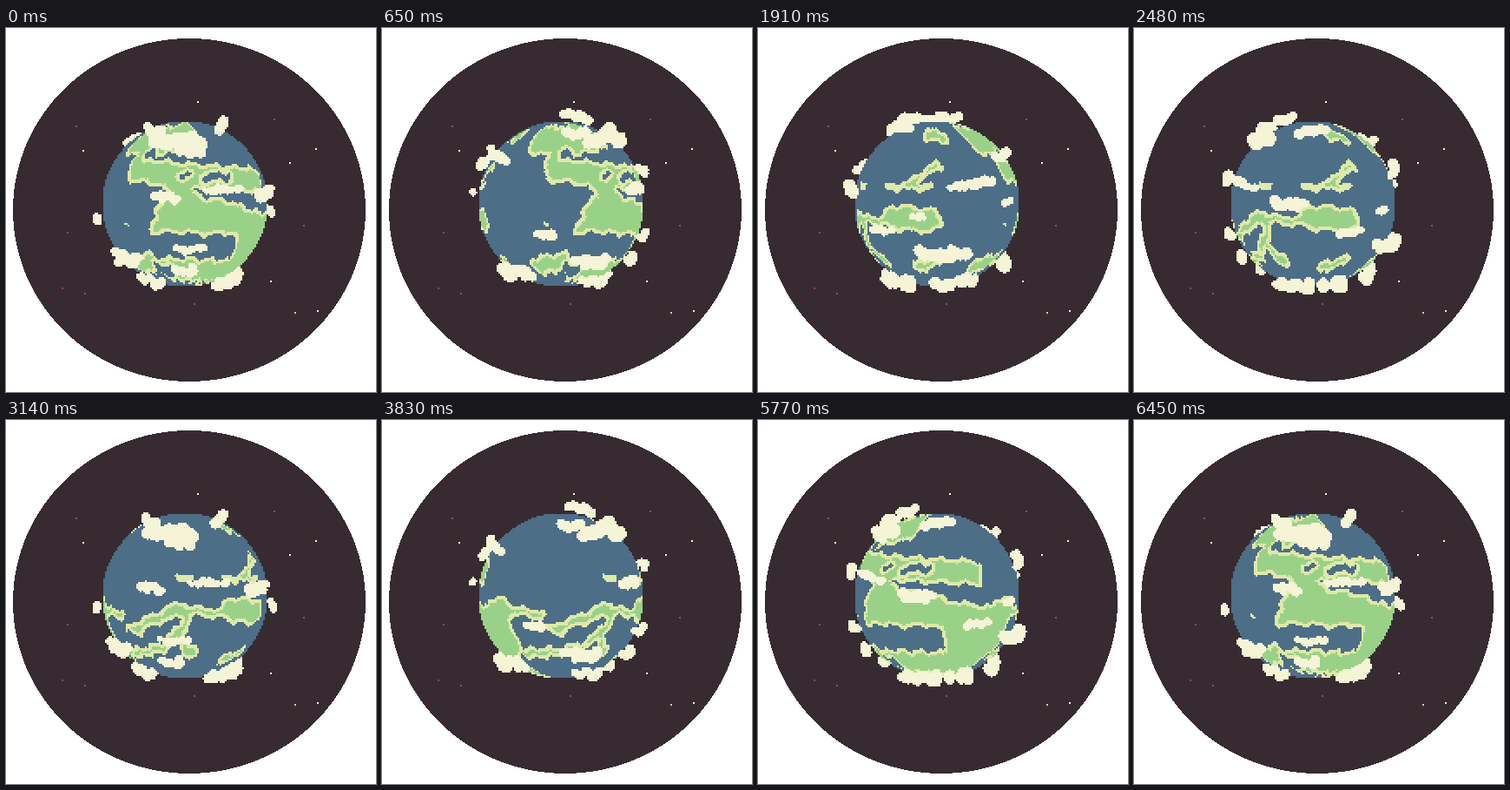
An HTML page with a canvas for the animation above (6.49 s loop, 426 by 418 pixels).

```html
<!DOCTYPE html>
<html>
<head>
<meta charset="utf-8">
<style>
  html, body { margin: 0; width: 426px; height: 418px; overflow: hidden; background: #fff; }
  svg, canvas { position: absolute; left: 0; top: 0; width: 426px; height: 418px; image-rendering: pixelated; }
</style>
</head>
<body>
<svg><ellipse cx="211" cy="209" rx="203" ry="197" fill="#372b31" shape-rendering="crispEdges"/></svg>
<canvas id="view" width="213" height="209"></canvas>
<script>
const LOOP = 6490, CX = 206, CY = 202, R = 94, CLOUD_R = 103;
const RAD = Math.PI / 180, TILT = 12 * RAD;
const W = 213, H = 209, MAP_W = 590, MAP_H = 2 * R, PER_DEG = MAP_W / 360;
const OCEAN = [77, 110, 135], GREEN = [154, 209, 136], COAST = [223, 233, 168], CLOUD = [245, 244, 214];

const ctx = document.getElementById('view').getContext('2d');
const image = ctx.createImageData(W, H);

// Brush strokes on the globe: width, then longitude and height of a few key points.
const land = [
  [36, -62, -74, -30, -70, 8, -80],
  [30, -42, -40, 0, -32, 68, -26],
  [24, -8, -18, 8, 0],
  [44, -8, 12, 25, 16, 50, 27, 80, 34],
  [20, -22, 26, 10, 20],
  [70, 66, 46, 88, 46],
  [24, 92, 14, 104, 14],
  [28, -25, 75, 90, 80],
  [22, -62, 72, -35, 66],
  [12, 105, 16, 132, 22],
  [16, 132, 48, 152, 34, 184, 14],
  [13, 110, 67, 140, 65, 165, 60, 186, 36, 184, 14],
  [30, 222, 16, 248, 19],
  [12, 190, 18, 222, 22],
  [14, 180, 44, 186, 62, 195, 68],
  [9, 217, -19, 250, -20],
  [12, 235, -22, 245, -38, 254, -42],
  [16, 240, -80, 262, -76],
  [14, 232, 74, 256, 65],
  [8, 182, -21, 190, -21],
  [3, -50, 25, -47, 25]
];
const water = [
  [24, -25, 50, 38, 48],
  [12, -30, 76, -16, 78],
  [10, -33, -55, -28, -56],
  [8, 16, -30, 34, -31],
  [7, 20, -11, 32, -10],
  [5, -3, -33, 2, -32],
  [16, 118, 42, 126, 45, 142, 53],
  [14, 160, 43, 172, 38]
];

// Cloud banks: longitude, height, length in degrees, puff size.
const banks = [
  [-9, -86, 50, 10], [6, -76, 20, 7], [-51, -92, 30, 7], [-13, -28, 13, 6], [28, -35, 26, 5],
  [3, 32, 18, 5], [0, 60, 12, 6], [-49, 51, 25, 8], [-37, 80, 25, 7], [-83, 14, 12, 5],
  [80, -93, 40, 7], [58, 85, 45, 8], [68, -20, 22, 7], [-140, -64, 30, 6], [-186, -42, 32, 6],
  [-160, -16, 6, 5], [-225, -5, 8, 5], [-210, 38, 32, 9], [-195, 79, 50, 8], [-115, 68, 32, 9],
  [-252, 13, 16, 5], [-255, 83, 30, 8]
];

const stars = [
  [CLOUD, 221, 85, 89, 141, 357, 139, 327, 155, 305, 291, 359, 325],
  [[236, 222, 150], 333, 327],
  [[146, 78, 84], 81, 113, 309, 105, 71, 235, 343, 227, 65, 299, 91, 305, 217, 317]
];

let seed = 7;
const random = () => (seed = seed * 16807 % 2147483647) / 2147483647;
const jitter = size => (random() - 0.5) * size;
const spin = (x, z, a) => [x * Math.cos(a) + z * Math.sin(a), z * Math.cos(a) - x * Math.sin(a)];

function buildMap() {
  const canvas = document.createElement('canvas');
  canvas.width = MAP_W;
  canvas.height = MAP_H;
  const g = canvas.getContext('2d');
  g.lineCap = g.lineJoin = 'round';
  const paint = ([width, ...p]) => {
    g.lineWidth = width;
    for (let wrap = -1; wrap <= 1; wrap++) {
      g.beginPath();
      for (let i = 0; i < p.length; i += 2) g.lineTo(p[i] * PER_DEG + wrap * MAP_W, p[i + 1] + R);
      g.stroke();
    }
  };
  land.forEach(paint);
  g.globalCompositeOperation = 'destination-out';
  water.forEach(paint);
  const data = g.getImageData(0, 0, MAP_W, MAP_H).data;

  // A gentle warp makes the shores uneven.
  const solid = (x, y) => {
    const a = x / MAP_W * 2 * Math.PI;
    const wx = Math.round(x + 2.5 * Math.sin(y / 5) + MAP_W) % MAP_W;
    const wy = Math.round(y + 2 * Math.sin(a * 19) + Math.sin(a * 43));
    return data[(Math.max(0, Math.min(MAP_H - 1, wy)) * MAP_W + wx) * 4 + 3] > 127;
  };
  const near = Array.from({ length: 8 }, (_, i) =>
    [Math.round(5 * Math.cos(i * 45 * RAD)), Math.round(4 * Math.sin(i * 45 * RAD))]);
  return Array.from({ length: MAP_W * MAP_H }, (_, i) => {
    const x = i % MAP_W, y = Math.floor(i / MAP_W);
    if (!solid(x, y)) return OCEAN;
    return near.every(([dx, dy]) => solid(x + dx, y + dy)) ? GREEN : COAST;
  });
}

function buildPuffs() {
  return banks.flatMap(([lon, height, length, size]) => {
    const r = Math.sqrt(CLOUD_R ** 2 - height ** 2);
    const n = Math.ceil(length * RAD * r / size * 1.6) + 2;
    return Array.from({ length: n }, (_, k) => {
      const a = (lon + length * (k / (n - 1) - 0.5)) * RAD + jitter(size) / r;
      return {
        x: r * Math.sin(a), y: height + jitter(size * 1.1), z: r * Math.cos(a),
        size: size * (0.6 + random() * 0.4)
      };
    });
  });
}

const map = buildMap(), puffs = buildPuffs();

function plot(x, y, color) {
  image.data.set([...color, 255], (y * W + x) * 4);
}

function drawStars([color, ...p]) {
  for (let i = 0; i < p.length; i += 2) plot(p[i] >> 1, p[i + 1] >> 1, color);
}

function drawPuff({ x, y, size }) {
  const cx = (CX + x) / 2, cy = (CY + y) / 2, r = size / 2;
  for (let py = Math.floor(cy - r); py <= cy + r; py++)
    for (let px = Math.floor(cx - r); px <= cx + r; px++)
      if (Math.hypot(px + 0.5 - cx, py + 0.5 - cy) <= r) plot(px, py, CLOUD);
}

function drawGlobe(turn) {
  for (let y = 1 - R; y < R; y += 2)
    for (let x = 1 - R; x < R; x += 2) {
      if (Math.hypot(x, y) > R + 1) continue;
      const sine = x / Math.sqrt(R * R - y * y);
      const lon = Math.asin(Math.max(-1, Math.min(1, sine))) / RAD - turn + 720;
      const col = Math.floor(lon * PER_DEG) % MAP_W;
      plot((CX + x) >> 1, (CY + y) >> 1, map[(y + R) * MAP_W + col]);
    }
}

function draw(now) {
  const t = Math.floor((now % LOOP + 10) / 30) * 30;
  const turn = 360 * t / LOOP;
  image.data.fill(0);
  stars.forEach(drawStars);
  // Clouds circle twice while the globe turns once.
  const moved = puffs.map(p => {
    const [x, z0] = spin(p.x, p.z, 2 * turn * RAD);
    const [y, z] = spin(p.y, z0, TILT);
    return { x, y, z, size: p.size };
  });
  moved.filter(p => p.z < 0).forEach(drawPuff);
  drawGlobe(turn);
  moved.filter(p => p.z >= 0).forEach(drawPuff);
  ctx.putImageData(image, 0, 0);
}

const start = performance.now();
function tick() {
  draw(performance.now() - start);
  requestAnimationFrame(tick);
}
tick();
</script>
</body>
</html>
```
